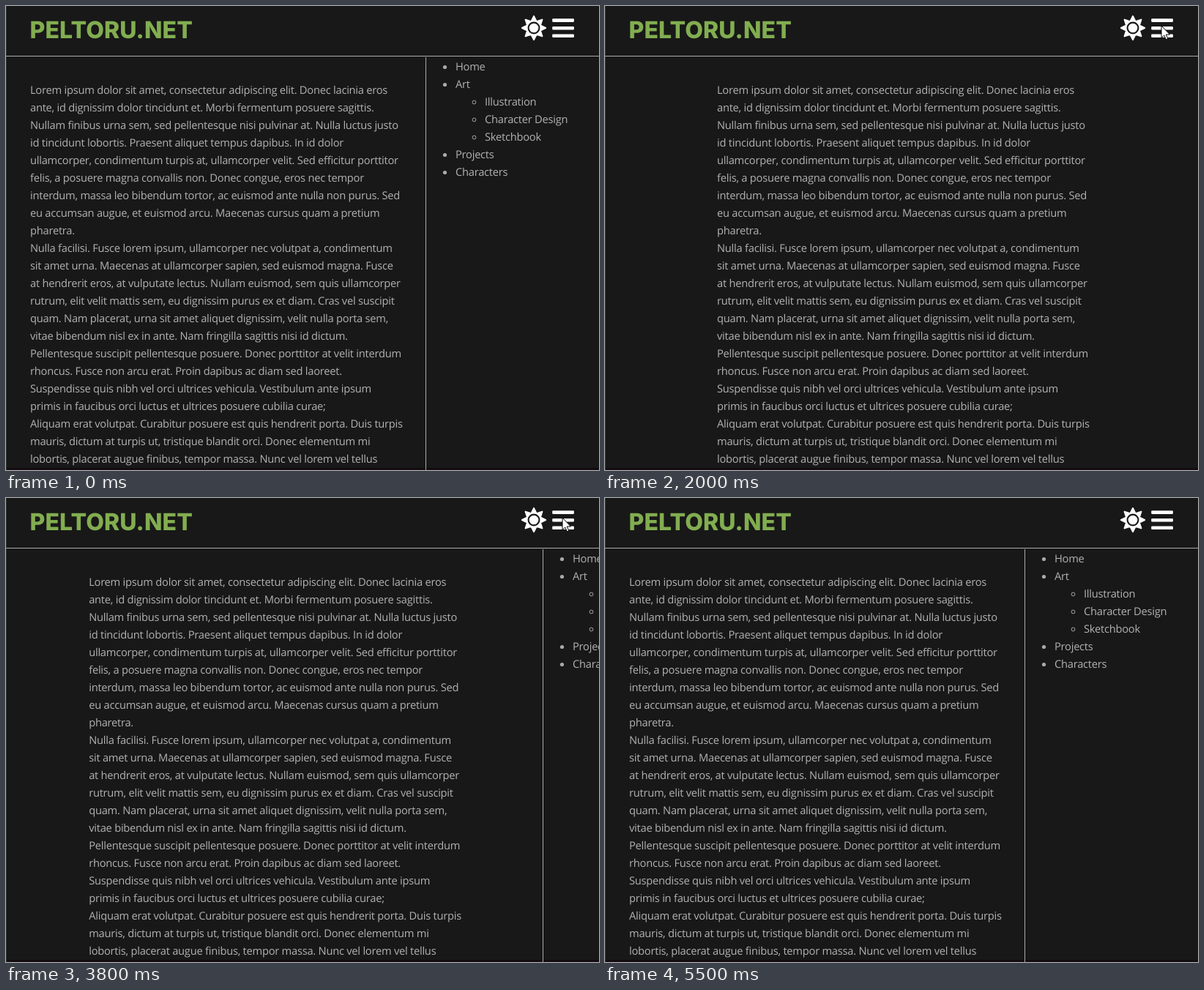
Write an HTML page that moves like this. It is 810 by 634 pixels and loops after 5600 ms.

```html
<!DOCTYPE html>
<html lang="en">
<head>
<meta charset="utf-8">
<title>Sliding menu</title>
<style>
html, body { margin: 0; width: 100%; height: 100%; overflow: hidden; background: #181818; }
svg { display: block; width: 810px; height: 634px; }
text { font: 14.7px "Open Sans", "Noto Sans", sans-serif; letter-spacing: -.25px; fill: #b2b2b2; text-rendering: geometricPrecision; }
.title { font: 800 32px Inter, sans-serif; fill: #82ad50; letter-spacing: .1px; }
.rule { fill: #aaa; }
.dot { fill: #aaa; }
.ring { fill: none; stroke: #aaa; }
</style>
</head>
<body>
<svg viewBox="0 0 810 634">
  <rect width="810" height="634" fill="#181818"/>
  <rect y="631" width="810" height="3" fill="#130c10"/>
  <rect width="1" height="634" fill="#303030"/>
  <g id="copy"></g>
  <g id="menu">
    <rect x="573" y="70" width="240" height="561" fill="#181818"/>
    <rect class="rule" x="573" y="70" width="1" height="564"/>
  </g>
  <rect class="rule" y="68" width="810" height="1"/>
  <text class="title" x="32.5" y="44">PELTORU.NET</text>
  <g transform="translate(721 30)">
    <path id="sun" fill="#fff" stroke="#fff" stroke-width="2" stroke-linejoin="round"/>
    <circle r="7.4" fill="#fff" stroke="#181818" stroke-width="2.1"/>
  </g>
  <g id="bars" fill="#fff"></g>
  <path id="cursor" d="M0 0V16.5L3.8 13 6.3 18.8 8.8 17.7 6.3 12H11.5Z" fill="#fff" stroke="#000" stroke-width="1"/>
</svg>
<script>
const LOOP = 5600, STEP = 100, TRAVEL = 240, SLIDE = 600;
const $ = id => document.getElementById(id);

const lines = `Lorem ipsum dolor sit amet, consectetur adipiscing elit. Donec lacinia eros
ante, id dignissim dolor tincidunt et. Morbi fermentum posuere sagittis.
Nullam finibus urna sem, sed pellentesque nisi pulvinar at. Nulla luctus justo
id tincidunt lobortis. Praesent aliquet tempus dapibus. In id dolor
ullamcorper, condimentum turpis at, ullamcorper velit. Sed efficitur porttitor
felis, a posuere magna convallis non. Donec congue, eros nec tempor
interdum, massa leo bibendum tortor, ac euismod ante nulla non purus. Sed
eu accumsan augue, et euismod arcu. Maecenas cursus quam a pretium
pharetra.
Nulla facilisi. Fusce lorem ipsum, ullamcorper nec volutpat a, condimentum
sit amet urna. Maecenas at ullamcorper sapien, sed euismod magna. Fusce
at hendrerit eros, at vulputate lectus. Nullam euismod, sem quis ullamcorper
rutrum, elit velit mattis sem, eu dignissim purus ex et diam. Cras vel suscipit
quam. Nam placerat, urna sit amet aliquet dignissim, velit nulla porta sem,
vitae bibendum nisl ex in ante. Nam fringilla sagittis nisi id dictum.
Pellentesque suscipit pellentesque posuere. Donec porttitor at velit interdum
rhoncus. Fusce non arcu erat. Proin dapibus ac diam sed laoreet.
Suspendisse quis nibh vel orci ultrices vehicula. Vestibulum ante ipsum
primis in faucibus orci luctus et ultrices posuere cubilia curae;
Aliquam erat volutpat. Curabitur posuere est quis hendrerit porta. Duis turpis
mauris, dictum at turpis ut, tristique blandit orci. Donec elementum mi
lobortis, placerat augue finibus, tempor massa. Nunc vel lorem vel tellus`.split("\n");

// A leading dash marks a nested entry.
const entries = ["Home", "Art", "-Illustration", "-Character Design", "-Sketchbook", "Projects", "Characters"];

function add(parent, tag, attrs, label = "") {
  const el = document.createElementNS("http://www.w3.org/2000/svg", tag);
  for (const key in attrs) el.setAttribute(key, attrs[key]);
  el.textContent = label;
  parent.append(el);
}

lines.forEach((line, i) => add($("copy"), "text", { x: 33, y: 120 + 24 * i }, line));

entries.forEach((entry, i) => {
  const nested = entry[0] === "-", y = 88 + 24 * i;
  add($("menu"), "circle", nested
    ? { class: "ring", cx: 639.5, cy: y - 4.5, r: 2.4 }
    : { class: "dot", cx: 599.5, cy: y - 4.5, r: 2.6 });
  add($("menu"), "text", { x: nested ? 654 : 614, y }, entry.replace("-", ""));
});

for (let i = 0; i < 3; i++)
  add($("bars"), "rect", { x: 746.2, y: 17.3 + 10.6 * i, width: 29.7, height: 4.6, rx: 1.1 });

const tips = Array.from({ length: 16 }, (_, i) => {
  const r = i % 2 ? 9.6 : 16.1, a = i * Math.PI / 8;
  return `${r * Math.sin(a)} ${-r * Math.cos(a)}`;
});
$("sun").setAttribute("d", `M${tips.join("L")}Z`);

// cubic-bezier(.25, .1, .25, 1)
function ease(x) {
  if (x <= 0) return 0;
  if (x >= 1) return 1;
  const curve = (a, b, u) => 3 * a * u * (1 - u) ** 2 + 3 * b * u * u * (1 - u) + u ** 3;
  let lo = 0, hi = 1;
  for (let i = 0; i < 24; i++) {
    const mid = (lo + hi) / 2;
    if (curve(.25, .25, mid) < x) lo = mid; else hi = mid;
  }
  return curve(.1, 1, lo);
}

// Start time and direction of each slide: 1 closes, -1 opens.
const slides = [[854, 1], [2080, -1], [3566, 1], [4480, -1]];
const closedAt = t => slides.reduce((sum, [start, dir]) => sum + dir * ease((t - start) / SLIDE), 0);

// Time, x, y of the pointer's tip.
const path = [[500, 753, 1], [600, 760, 27], [4500, 760, 27], [4600, 690, 200], [4700, 543.5, 516.5], [4800, 470, 660]];

function pointerAt(t) {
  const next = path.findIndex(p => p[0] > t);
  if (next < 1) return null;
  const [t0, x0, y0] = path[next - 1], [t1, x1, y1] = path[next];
  const k = (t - t0) / (t1 - t0);
  return [x0 + (x1 - x0) * k, y0 + (y1 - y0) * k];
}

function draw(now) {
  // The picture advances ten times a second.
  const t = Math.floor(now % LOOP / STEP) * STEP;
  const shift = closedAt(t) * TRAVEL;
  $("menu").setAttribute("transform", `translate(${Math.round(shift)} 0)`);
  $("copy").setAttribute("transform", `translate(${shift / 2} 0)`);
  const tip = pointerAt(t);
  $("cursor").setAttribute("visibility", tip ? "visible" : "hidden");
  if (tip) $("cursor").setAttribute("transform", `translate(${tip})`);
}

const began = performance.now();
function tick() {
  draw(performance.now() - began);
  requestAnimationFrame(tick);
}
tick();
</script>
</body>
</html>
```
